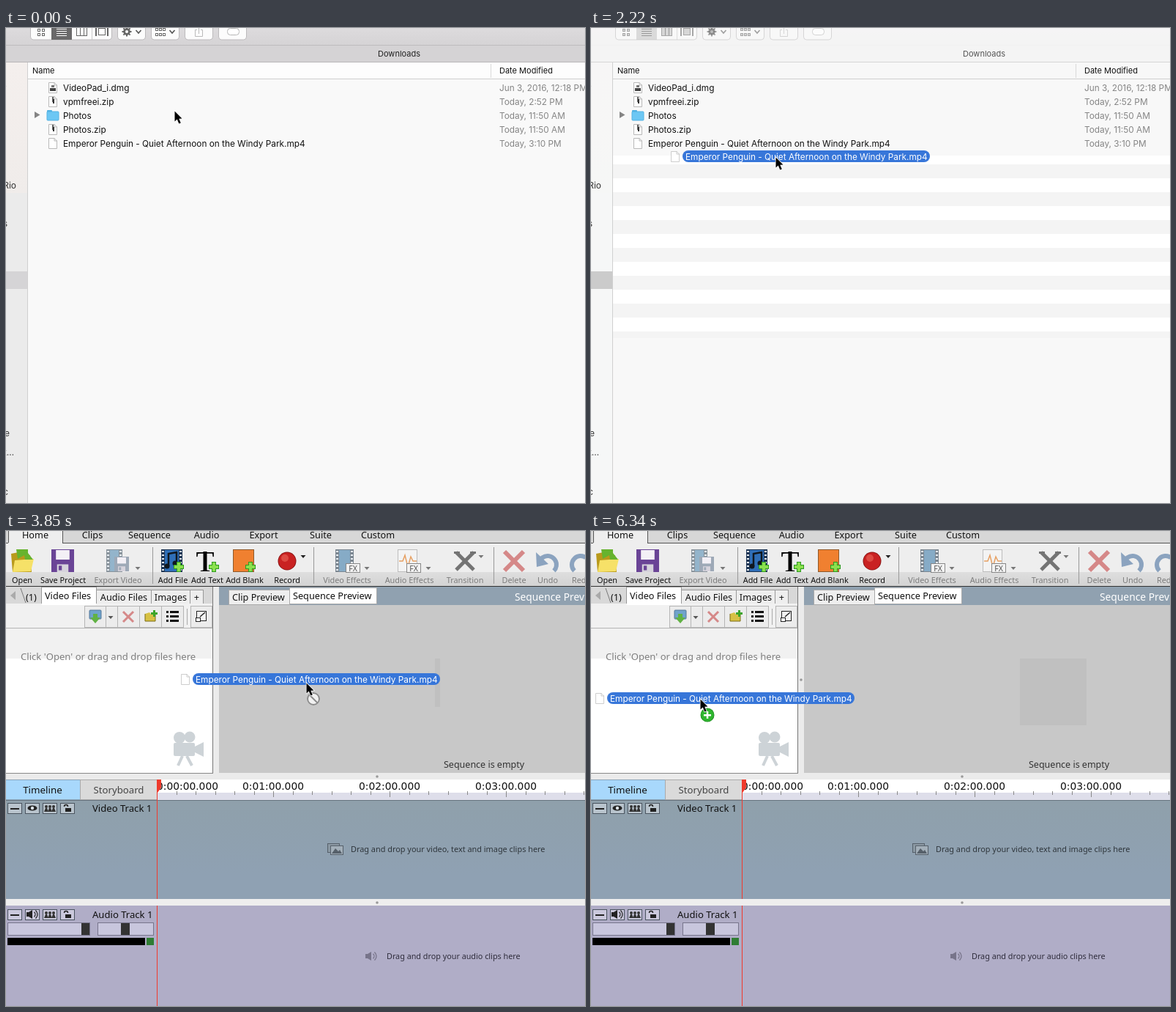
Animation of 791 by 648 pixels, one loop 8 s. Source, as an HTML page with a canvas:

```html
<!DOCTYPE html>
<html lang="en">
<head>
<meta charset="utf-8">
<title>Drag a clip into the editor</title>
<style>
html, body { margin: 0; width: 100%; height: 100%; overflow: hidden; background: #f9f9f9; }
canvas { display: block; }
</style>
</head>
<body>
<canvas id="stage" width="791" height="648"></canvas>
<script>
const W = 791, H = 648, LOOP = 8000, FIRST = 150, STEP = 147.35;
const ctx = document.getElementById('stage').getContext('2d');
const UI = 'Inter, sans-serif', APP = '"Noto Sans", sans-serif';
const CLIP = 'Emperor Penguin - Quiet Afternoon on the Windy Park.mp4';

// Pointer tip at [step, x, y]; linear in between.
const PATH = [[0, 230, 113], [1, 221, 130], [2, 206, 150], [3, 201, 158], [4, 203, 160],
  [5, 222, 166], [6, 242, 173], [7, 252, 176], [24, 252, 176], [25, 298, 191],
  [26, 410, 207], [27, 480, 214], [28, 488, 220], [29, 440, 236], [30, 310, 244],
  [31, 233, 241], [32, 213, 233], [34, 186, 230], [37, 165, 226], [40, 159, 224],
  [42, 150, 228], [43, 149, 229]];

function pointer(k) {
  const i = PATH.findIndex(p => p[0] >= k);
  if (i < 0) return PATH[PATH.length - 1].slice(1);
  if (i === 0) return PATH[0].slice(1);
  const [a, ax, ay] = PATH[i - 1], [b, bx, by] = PATH[i], f = (k - a) / (b - a);
  return [ax + (bx - ax) * f, ay + (by - ay) * f];
}

function box(x, y, w, h, color) { ctx.fillStyle = color; ctx.fillRect(x, y, w, h); }
function frame(x, y, w, h, fill, stroke) {
  box(x, y, w, h, stroke);
  box(x + 1, y + 1, w - 2, h - 2, fill);
}
function disc(x, y, r, color) {
  ctx.fillStyle = color;
  ctx.beginPath(); ctx.arc(x, y, r, 0, 7); ctx.fill();
}
function rounded(x, y, w, h, r, fill, stroke) {
  ctx.beginPath(); ctx.roundRect(x, y, w, h, r);
  ctx.fillStyle = fill; ctx.fill();
  if (stroke) { ctx.strokeStyle = stroke; ctx.lineWidth = 1; ctx.stroke(); }
}
function trace(points) {
  ctx.beginPath();
  for (let i = 0; i < points.length; i += 2) ctx.lineTo(points[i], points[i + 1]);
}
function poly(color, ...points) { trace(points); ctx.fillStyle = color; ctx.fill(); }
function line(color, width, ...points) {
  trace(points); ctx.strokeStyle = color; ctx.lineWidth = width; ctx.stroke();
}
function arc(color, width, x, y, r, from, to) {
  ctx.beginPath(); ctx.arc(x, y, r, from, to);
  ctx.strokeStyle = color; ctx.lineWidth = width; ctx.stroke();
}
function text(s, x, y, size, color = '#111', font = UI, align = 'left') {
  ctx.font = `${size}px ${font}`;
  ctx.textAlign = align;
  ctx.fillStyle = color;
  ctx.fillText(s, x, y);
}
function fade(y0, y1, c0, c1) {
  const g = ctx.createLinearGradient(0, y0, 0, y1);
  g.addColorStop(0, c0); g.addColorStop(1, c1);
  return g;
}
function chevron(x, y) { line('#555', 1.6, x - 3.5, y - 2, x, y + 2, x + 3.5, y - 2); }
function caret(x, y, color = '#222') { poly(color, x - 3.5, y - 2, x + 3.5, y - 2, x, y + 2); }

function page(x, y) {
  trace([x + .5, y + .5, x + 8, y + .5, x + 11.5, y + 4, x + 11.5, y + 14.5, x + .5, y + 14.5]);
  ctx.closePath();
  ctx.fillStyle = '#fff'; ctx.fill();
  ctx.strokeStyle = '#b9b9b9'; ctx.lineWidth = 1; ctx.stroke();
  line('#b9b9b9', 1, x + 8, y, x + 8, y + 4, x + 12, y + 4);
}

// ---- File manager ----

function toolbar(blur) {
  box(0, 0, W, 24, fade(0, 24, '#dddbdd', '#d5d3d5'));
  box(0, 23, W, 1, '#bebcbe');
  box(0, 24, W, 22, '#d5d3d5');
  box(0, 0, W, 46, `rgba(249,249,249,${blur * .88})`);
  ctx.globalAlpha = 1 - blur * .45;
  for (const [x, w] of [[33, 111], [152, 38], [198, 38], [244, 38], [290, 38]])
    rounded(x + .5, -10, w, 26, 4, '#fcfcfc', '#bcbabc');
  box(62, 0, 28, 16, blur > .5 ? '#c4c4c4' : '#6a696a');
  box(117, 0, 1, 16, '#c9c9c9');
  for (const x of [43, 49]) for (const y of [1, 7]) frame(x, y, 4, 4, '#fff', '#666');
  for (const y of [1, 4, 7, 10]) box(69, y, 14, 1, blur > .5 ? '#666' : '#fff');
  frame(96, -2, 15, 13, '#fff', '#666');
  box(101, 0, 1, 10, '#666'); box(106, 0, 1, 10, '#666');
  frame(126, 0, 10, 10, '#fff', '#666');
  box(122, 0, 2, 11, '#666'); box(138, 0, 2, 11, '#666');
  for (let i = 0; i < 4; i++) {
    const a = i * Math.PI / 4, c = 6.5 * Math.cos(a), s = 6.5 * Math.sin(a);
    line('#666', 2, 165 - c, 5 - s, 165 + c, 5 + s);
  }
  disc(165, 5, 4.8, '#666'); disc(165, 5, 2, '#fff');
  chevron(181, 5); chevron(227, 5);
  for (const x of [204, 209, 214]) for (const y of [0, 7]) frame(x, y, 4, 4, '#fff', '#666');
  line('#bbb', 1, 261, 2.5, 258.5, 2.5, 258.5, 11.5, 268.5, 11.5, 268.5, 2.5, 266, 2.5);
  line('#bbb', 1, 263.5, 8, 263.5, 0);
  rounded(302.5, .5, 16, 9, 4, '#fff', '#b5b5b5');
  ctx.globalAlpha = 1;
}

function sidebar(k, blur) {
  box(0, 47, 29, H - 47, '#ebebeb');
  box(0, 47, 29, 178, k < 9 ? fade(47, 225, '#f4efed', '#f0ecea') : fade(47, 225, '#f1edeb', '#eceeed'));
  if (k >= 9) box(0, 225, 29, 423, '#eceeee');
  box(0, 47, 29, H - 47, `rgba(250,250,250,${blur * .75})`);
  box(0, 332, 29, 24, blur ? '#cbcbcb' : k < 9 ? '#d5d4d6' : '#d0d0d0');
  box(29, 47, 1, H - 47, '#d0d0d0');
  for (const [s, x, y] of [['i', 1, 88], ['Rio', 14, 219], ['s', 2, 271], ['e', 5, 557], ['t…', 11, 583], ['c', 3, 637]])
    text(s, x, y, 12, '#333', UI, 'right');
}

function fileRow(i, name, date, kind) {
  const y = 81 + 19 * i;
  if (kind === 'folder') {
    poly('#848484', 39, y - 5, 46.5, y - .5, 39, y + 4);
    rounded(56, y - 7, 7, 5, 1, '#4fb1e3');
    rounded(56, y - 5, 16, 12, 1, '#6cc7f4', '#55b2e2');
  } else {
    page(58, y - 7);
    if (kind === 'zip') { box(63, y - 6, 2, 7, '#666'); box(64, y - 3, 2, 6, '#333'); }
    if (kind === 'dmg') { box(60, y + 1, 8, 4, '#444'); box(62, y - 3, 4, 3, '#777'); }
  }
  text(name, 78, y + 5, 11.8);
  text(date, 674, y + 5, 11.8, '#858585');
}

function fileManager(k) {
  const blur = Math.min(1, Math.max(0, (k - 12) / 3));
  toolbar(blur);
  text('Downloads', 537, 39, 11, blur > .5 ? '#555' : '#222', UI, 'center');
  box(0, 46, W, 1, blur > .5 ? '#d6d6d6' : '#b8b6b8');
  sidebar(k, blur);
  box(30, 47, W - 30, H - 47, blur === 1 ? '#f8f8f8' : '#f9f9f9');
  box(30, 47, W - 30, 22, blur === 1 ? '#f8f8f8' : '#fdfdfd');
  box(30, 69, W - 30, 1, '#cfcfcf');
  box(662, 49, 1, 19, '#d9d9d9');
  text('Name', 36, 62, 11);
  text('Date Modified', 674, 62, 11);
  if (blur === 1) {
    box(30, 174, W - 30, 249, '#fff');
    for (let y = 186; y < 423; y += 38) box(30, y, W - 30, Math.min(19, 423 - y), '#f4f4f4');
  }
  fileRow(0, 'VideoPad_i.dmg', 'Jun 3, 2016, 12:18 PM', 'dmg');
  fileRow(1, 'vpmfreei.zip', 'Today, 2:52 PM', 'zip');
  fileRow(2, 'Photos', 'Today, 11:50 AM', 'folder');
  fileRow(3, 'Photos.zip', 'Today, 11:50 AM', 'zip');
  fileRow(4, CLIP, 'Today, 3:10 PM');
  if (k >= 9 && blur < 1) {
    ctx.globalAlpha = k === 9 ? .5 : 1 - blur;
    ctx.strokeStyle = '#a9cdf8';
    ctx.lineWidth = 2.5;
    ctx.strokeRect(31.2, 70.6, W, H);
    ctx.globalAlpha = 1;
  }
}

// ---- Video editor ----

function film(x, y, w, h, body, edge) {
  box(x, y, w, h, edge);
  box(x + 5, y + 1, w - 10, h - 2, body);
  for (let p = y + 2; p < y + h - 2; p += 5) {
    box(x + 1, p, 3, 2, '#e8eef4');
    box(x + w - 4, p, 3, 2, '#e8eef4');
  }
}
function floppy(x, y, w, color) {
  box(x, y, w, w, color);
  box(x + w * .2, y + 1, w * .6, w * .42, '#f3f0f6');
  box(x + w * .25, y + w * .66, w * .5, w * .34, '#d6d3dc');
  box(x + w * .32, y + w * .72, w * .14, w * .2, color);
}
function plus(x, y) {
  box(x - 7, y - 3, 14, 6, '#2c9a1f'); box(x - 3, y - 7, 6, 14, '#2c9a1f');
  box(x - 6, y - 2, 12, 4, '#8be04e'); box(x - 2, y - 6, 4, 12, '#8be04e');
}
function cross(x, y, r, width, color) {
  line(color, width, x - r, y - r, x + r, y + r);
  line(color, width, x + r, y - r, x - r, y + r);
}
function effectsTag(x) {
  frame(x, 44, 20, 13, '#f2f2f2', '#888');
  text('FX', x + 10, 55, 10.5, '#555', APP, 'center');
}

function ribbon() {
  box(0, 0, W, 17, '#d7d7d7');
  box(0, 16, W, 1, '#555');
  box(0, 17, W, 39, '#eeeeee');
  box(0, 56, W, 20, fade(50, 76, '#e2e2e2', '#d2d2d2'));
  box(3, 0, 75, 17, '#eeeeee');
  box(3, 0, 1, 16, '#555'); box(77, 0, 1, 17, '#555');
  box(0, 75, W, 1, '#333');
  for (const [s, x] of [['Home', 40], ['Clips', 118], ['Sequence', 196], ['Audio', 274], ['Export', 352], ['Suite', 430], ['Custom', 508]])
    text(s, x, 10, 12.7, '#111', APP, 'center');
  for (const x of [200, 420, 666]) box(x, 22, 1, 50, '#999');

  poly('#b99a1c', 7, 31, 17, 29, 20, 33, 33, 33, 35, 56, 9, 56);
  poly('#f6e168', 12, 40, 38, 38, 34, 55, 9, 56);
  poly('#67b32e', 14, 25, 30, 25, 30, 30, 37, 39, 26, 39, 25, 33, 16, 38);
  floppy(62, 25, 31, '#6a4496');
  film(137, 25, 22, 31, '#93b4cb', '#8a949c');
  floppy(148, 35, 20, '#9ea9b7');
  caret(180, 51, '#777');
  film(212, 25, 29, 31, '#2f6fb8', '#1e3554');
  line('#101820', 2.5, 222, 48, 222, 31, 233, 29, 233, 44);
  disc(220, 48, 3.5, '#101820'); disc(231, 44, 3.5, '#101820');
  plus(236, 49);
  text('T', 272, 55, 41, '#000', '"Liberation Serif", serif', 'center');
  line('#000', 5, 272, 28, 272, 55);
  plus(284, 49);
  frame(310, 25, 29, 31, '#f08030', '#8e5a2c');
  plus(334, 49);
  disc(384, 41, 12.5, '#8c1515'); disc(384, 41, 11.5, '#c92222'); disc(381, 37, 5, '#dd4a42');
  caret(406, 35);
  film(450, 25, 25, 31, '#86abc6', '#7c8791'); effectsTag(464); caret(493, 51, '#777');
  frame(535, 25, 27, 31, '#f3f3f3', '#bdbdbd');
  line('#e6a063', 1.5, 537, 41, 542, 41, 545, 33, 549, 49, 553, 35, 556, 41, 561, 41);
  effectsTag(547); caret(577, 51, '#777');
  cross(627, 41, 12, 5, '#747474'); box(612, 28, 8, 3, '#747474'); box(634, 28, 8, 3, '#747474');
  caret(649, 35, '#777');
  cross(694, 41, 13, 6, '#d58888');
  arc('#8ba3bf', 6, 740, 46, 12, Math.PI * 1.05, Math.PI * 2.25);
  poly('#8ba3bf', 724, 29, 725, 49, 741, 45);
  arc('#8ba3bf', 6, 785, 46, 12, Math.PI * .75, Math.PI * 1.7);

  for (const [s, x, off] of [['Open', 22], ['Save Project', 78], ['Export Video', 153, 1], ['Add File', 228], ['Add Text', 275], ['Add Blank', 326],
    ['Record', 384], ['Video Effects', 466, 1], ['Audio Effects', 551, 1], ['Transition', 627, 1], ['Delete', 694, 1], ['Undo', 740, 1], ['Redo', 786, 1]])
    text(s, x, 71, 10.9, off ? '#7d7d7d' : '#111', APP, 'center');
}

function camera() {
  const grey = '#cdd3d7';
  disc(237, 282, 8, grey); disc(251, 281, 7.5, grey);
  rounded(229, 289, 29, 18, 2, grey);
  poly(grey, 258, 294, 270, 288, 270, 308, 258, 302);
  line(grey, 4, 241, 307, 235, 320); line(grey, 4, 247, 307, 254, 320);
}

function clipBin(settled) {
  box(0, 76, 291, 23, '#d8d8d8');
  poly('#aaa', 13, 82, 13, 94, 6, 88);
  line('#777', 1, 20, 78, 27, 98);
  for (const [s, x, w] of [['Audio Files', 123, 75], ['Images', 198, 53], ['+', 251, 18]]) {
    frame(x, 80, w + 1, 20, '#eeeeee', '#999');
    text(s, x + w / 2 + .5, 95, 12.7, '#111', APP, 'center');
  }
  frame(48, 76, 76, 24, '#fff', '#999');
  text('(1)', 27, 95, 12.7, '#111', APP);
  text('Video Files', 53, 93, 12.7, '#111', APP);
  box(0, 99, 283, 231, '#f1f1f1');
  box(49, 98, 74, 3, '#fff');
  if (settled) {
    box(0, 174, 282, 156, '#fff');
    camera();
  }
  for (const [x, w] of [[107, 30], [136, 17], [152, 31], [182, 31], [212, 31], [252, 30]])
    frame(x, 102, w, 30, '#ececec', '#b5b5b5');
  box(0, 132, 283, 1, '#b5b5b5');
  box(247, 106, 1, 22, '#aaa');
  rounded(114, 108, 16, 12, 1, '#6fa3cc', '#55799a');
  poly('#61b244', 119, 113, 125, 113, 125, 118, 129, 118, 122, 126, 115, 118, 119, 118);
  caret(143, 118, '#555');
  cross(167, 117, 7, 3, '#d58888');
  poly('#d7c144', 190, 113, 196, 111, 198, 114, 204, 114, 204, 123, 190, 123);
  line('#7c6c14', 1, 190, 113, 190, 123, 204, 123, 204, 114);
  box(201, 108, 3, 9, '#3da52b'); box(198, 111, 9, 3, '#3da52b');
  for (const y of [109, 115, 121]) { box(219, y, 3, 3, '#111'); box(224, y, 12, 3, '#111'); }
  frame(260, 109, 14, 14, '#f4f4f4', '#222'); frame(259, 118, 7, 6, '#fff', '#222');
  line('#222', 1.5, 272, 111, 265, 117);
  text("Click 'Open' or drag and drop files here", 20, 176, 13.1, '#7f7f7f', APP);
  box(282, 76, 1, 255, '#777');
  box(283, 76, 8, 254, '#ebebeb');
  disc(287, 203, 1.8, '#999');
}

function preview(k) {
  box(291, 76, 500, 25, '#90a1b0');
  box(291, 101, 500, 229, '#c8c8c8');
  frame(304, 80, 84, 21, '#eeeeee', '#aaa');
  frame(387, 77, 120, 23, '#fff', '#aaa');
  text('Clip Preview', 309, 95, 12.7, '#111', APP);
  text('Sequence Preview', 392, 93, 12.7, '#111', APP);
  text('Sequence Preview', 695, 95, 13.8, '#fff', APP);
  if (k >= 26) box(586, 174, k === 26 ? 7 : 91, k === 26 ? 66 : 91, '#c0c0c0');
  text('Sequence is empty', 598, 323, 12.5, '#333', APP);
}

function trackButtons(y, fill) {
  for (const x of [3, 27, 51, 75]) frame(x - 1, y, 20, 15, fill, '#4b5560');
  box(6, y + 7, 12, 2, '#222');
  for (const x of [55, 60, 65]) {
    disc(x, y + 5, 2, '#333');
    poly('#333', x - 1, y + 7, x + 1, y + 7, x + 3, y + 12, x - 3, y + 12);
  }
  arc('#222', 1.5, 82, y + 5, 2.5, Math.PI, Math.PI * 2);
  box(81, y + 7, 8, 5, '#222');
}
function speaker(x, y, color) {
  poly(color, x - 7, y - 3, x - 4, y - 3, x + 1, y - 6, x + 1, y + 6, x - 4, y + 3, x - 7, y + 3);
  arc(color, 1.3, x + 1, y, 4, -.9, .9);
  arc(color, 1.3, x + 1, y, 7, -.9, .9);
}

function timeline() {
  box(0, 330, W, 9, '#ebebeb');
  box(0, 330, 283, 1, '#888');
  disc(507, 335, 1.8, '#999');
  box(207, 339, W - 207, 18, '#fff');
  box(207, 357, W - 207, 10, '#dedeea');
  for (let i = 1; i < 23; i++) box(Math.round(206 + 26.5 * i), 355, 1, i % 6 ? 5 : 8, '#888');
  // The first label is pushed right to stay inside the ruler.
  for (let i = 0; i < 4; i++)
    text(`0:0${i}:00.000`, Math.max(248, 206 + 159 * i), 353, 13.8, '#111', '"DejaVu Sans", sans-serif', 'center');
  frame(-1, 339, 103, 28, '#a8d8fc', '#8ba5b8');
  frame(101, 339, 106, 28, '#dadada', '#aaa');
  text('Timeline', 50, 358, 13.4, '#111', APP, 'center');
  text('Storyboard', 154, 358, 13.2, '#444', APP, 'center');
  box(0, 367, W, 135, fade(367, 470, '#8fa0ab', '#8fa1b3'));
  box(0, 367, W, 1, '#66737e');
  trackButtons(371, '#b9c4cd');
  ctx.beginPath(); ctx.ellipse(36, 378, 6.5, 3.6, 0, 0, 7); ctx.fillStyle = '#222'; ctx.fill();
  disc(36, 378, 2.2, '#dde4e9');
  text('Video Track 1', 118, 383, 13.1, '#111', APP);
  frame(439, 426, 17, 13, '#8b98a3', '#56606a');
  frame(443, 429, 18, 13, '#a3afb9', '#56606a');
  poly('#56606a', 445, 440, 450, 433, 454, 437, 456, 435, 459, 440);
  text('Drag and drop your video, text and image clips here', 471, 438, 10.9, '#2f363c', APP);
  box(0, 511, W, 137, '#b0adc7');
  trackButtons(516, '#cbc9dd');
  speaker(35, 523, '#222');
  text('Audio Track 1', 118, 528, 13.1, '#111', APP);
  frame(2, 534, 113, 18, '#c8c6dd', '#77758c'); box(103, 535, 11, 16, '#333');
  frame(125, 534, 77, 18, '#c8c6dd', '#77758c'); box(157, 535, 12, 16, '#333');
  box(2, 555, 188, 10, '#000'); box(192, 555, 10, 10, '#2f7d33');
  speaker(498, 580, '#77748a');
  text('Drag and drop your audio clips here', 520, 584, 10.8, '#2f2d3c', APP);
  box(206, 339, 1, H - 339, '#f03a2e');
  poly('#ee3a2c', 206, 339, 212, 339, 212, 350, 207, 357);
  box(0, 502, W, 9, '#eeeeee');
  disc(507, 507, 1.8, '#999');
}

function editor(k) { ribbon(); clipBin(k >= 23); preview(k); timeline(); }

// ---- App switcher ----

function switcher(alpha) {
  ctx.globalAlpha = alpha;
  box(-32, 278, 102, 102, '#b4b2cc');
  box(107, 281, 104, 100, '#5fb4e6');
  box(228, 266, 129, 128, '#343436');
  disc(425, 329, 59, '#2f74b4');
  disc(557, 329, 58, '#38a0da');
  box(632, 270, 118, 118, '#35b9c6');
  disc(820, 325, 55, '#52aae6');
  disc(594, 290, 26.5, '#d83c3c');
  text('131', 593, 298, 22, '#fff', UI, 'center');
  text('ReelMoor', 291, 416, 14, '#60666c', UI, 'center');
  ctx.globalAlpha = 1;
}

// ---- Dragged item and pointer ----

function draggedClip(x, y) {
  ctx.globalAlpha = .7;
  page(x - 16, y + 1);
  ctx.globalAlpha = 1;
  rounded(x, y, 338, 16, 8, '#3776d9');
  text(CLIP, x + 4, y + 13, 11.8, '#fff');
}
function badge(k, x, y) {
  if (k > 30) {
    disc(x, y, 9.5, '#1d8a1f'); disc(x, y, 8.7, '#2fb52f');
    box(x - 5, y - 1, 10, 2.5, '#fff'); box(x - 1.2, y - 5, 2.5, 10, '#fff');
  } else {
    disc(x, y, 9, 'rgba(255,255,255,.75)');
    arc('#8b8b8b', 2, x, y, 8, 0, 7);
    line('#8b8b8b', 2, x - 5.5, y - 5.5, x + 5.5, y + 5.5);
  }
}
function arrow(x, y) {
  trace([x, y, x, y + 14, x + 3.2, y + 11, x + 5.8, y + 17, x + 8.3, y + 16, x + 5.8, y + 10.2, x + 10, y + 10]);
  ctx.closePath();
  ctx.strokeStyle = '#fff'; ctx.lineWidth = 1.4; ctx.stroke();
  ctx.fillStyle = '#000'; ctx.fill();
}

function draw(now) {
  const k = Math.max(0, Math.floor((now % LOOP - FIRST) / STEP) + 1);
  const [x, y] = pointer(k), [px, py] = pointer(k - 1);
  if (k < 22) fileManager(k); else editor(k);
  if (k >= 19 && k < 22) {
    box(0, 174, W, 249, 'rgba(215,215,215,.85)');
    switcher(1);
  }
  if (k === 22) {
    box(0, 331, W, 55, 'rgba(170,180,190,.4)');
    switcher(.68);
  }
  // The dragged label trails the pointer by a quarter of its last move.
  if (k > 3) draggedClip(Math.round(x - 127 - (x - px) / 4), Math.round(y - 9 - (y - py) / 4));
  if (k >= 22) badge(k, Math.round(x) + 10, Math.round(y) + 22);
  arrow(Math.round(x) + .5, Math.round(y) + .5);
  requestAnimationFrame(draw);
}
requestAnimationFrame(draw);
</script>
</body>
</html>
```
